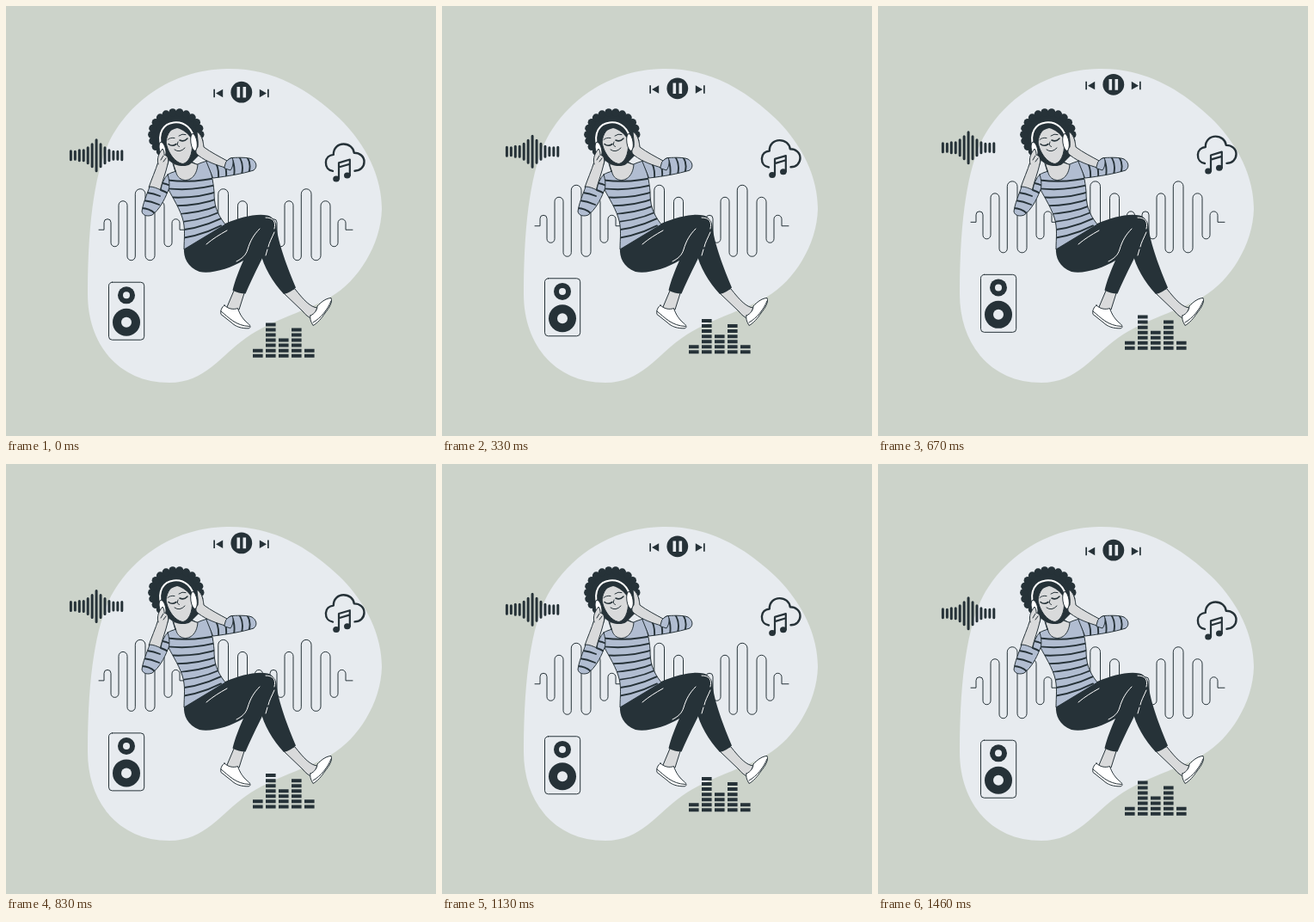
Recreate the animation shown at these times as an HTML page. Size 500x500 px, loop 1500 ms.

```html
<!DOCTYPE html>
<html lang="en">
<head>
<meta charset="utf-8">
<title>Listening to music</title>
<style>
  html, body { margin: 0; height: 100%; overflow: hidden; background: #ccd3ca; }
  svg { display: block; width: 100vw; height: 100vh; }
  .ink { fill: #263238; }
  .pale { fill: #e7ebef; }
  .line { fill: none; stroke: #263238; stroke-linecap: round; stroke-linejoin: round; }
  .skin, .shirt, .white { stroke: #263238; stroke-width: 1; stroke-linejoin: round; stroke-linecap: round; }
  .skin { fill: #d9dadb; }
  .shirt { fill: #b1bdd1; }
  .white { fill: #fff; }
  .seam { fill: none; stroke: #fff; stroke-width: 1; stroke-linecap: round; }
</style>
</head>
<body>
<svg viewBox="0 0 500 500">
  <defs>
    <path id="torso" d="M188 196C191 194 195 193 198 192L223 184C227 182 231 181 234 180C238 189 241 204 242 216C242 230 244 240 255 254L207 283C207 270 209 258 205 246C200 231 191 219 188 211Z"/>
    <path id="leftSleeve" d="M188 196C190 202 191 211 188 216C184 226 178 237 170 243C165 245 159 244 158 239C159 230 164 219 167 210C171 210 176 212 180 214C181 207 184 200 188 196Z"/>
    <path id="rightSleeve" d="M233 180C241 179 250 180 256 181C258 179 260 177 263 176.500C272 176 281 176 286 178C291 181 293 187 288 191C275 195 258 198 241 200Z"/>
    <clipPath id="torsoClip"><use href="#torso"/></clipPath>
    <clipPath id="leftClip"><use href="#leftSleeve"/></clipPath>
    <clipPath id="rightClip"><use href="#rightSleeve"/></clipPath>
  </defs>

  <path class="pale" d="M257 73C310 72 352 97 387 130C420 162 437 200 437 236C436 278 409 320 378 338C350 355 312 363 279 386C250 406 232 438 190 438C130 438 95 392 95 335C95 240 106 190 119 160C140 115 190 74 257 73Z"/>

  <g id="floating">
    <path id="wave" class="line"/>
    <path id="voice" class="line" stroke-width="3"/>
    <path id="equalizer" class="ink"/>

    <circle class="ink" cx="273.8" cy="100.5" r="12.4"/>
    <path class="pale" d="M268.5 94.2h3.6v12.6h-3.6zM275.5 94.2h3.6v12.6h-3.6z"/>
    <path class="ink" d="M241.3 97h1.7v9.5h-1.7zM252.2 97v9.5l-8.2-4.7zM304 97h1.7v9.5h-1.7zM294.8 97v9.5l8.2-4.7z"/>

    <path class="line" stroke-width="2.4" d="M380 192.2C375 191.600 371.7 187.600 371.9 182C372.2 176.600 376 173.600 380.8 173.2C380.6 165.600 386 160.800 392.5 160.800C399 160.800 404 165 404.8 171C411 170.900 416.6 175 416.5 181.500C416.4 187.600 412 191.900 405.5 192"/>
    <path class="line" stroke-width="2.2" d="M387 201.2V182.6L399.8 178.8V197.4M387 187.8L399.8 184"/>
    <ellipse class="ink" cx="384" cy="201.2" rx="3.8" ry="3.5"/>
    <ellipse class="ink" cx="396.8" cy="197.4" rx="3.8" ry="3.5"/>

    <rect class="line" x="119.5" y="321.5" width="41.2" height="67" rx="4"/>
    <circle class="ink" cx="140" cy="336.6" r="10"/>
    <circle class="pale" cx="140" cy="336.6" r="4"/>
    <circle class="ink" cx="140" cy="368" r="16"/>
    <circle class="pale" cx="140" cy="368" r="6"/>
  </g>

  <g id="legs">
    <path class="skin" d="M323 334L345 355C348 359 352 362 356 364L362 351C354 350 347 343 336 329Z"/>
    <path class="white" d="M354 360C359 358 362 353 362 349C366 345 371 340 378 339.500C380 344 376 351 371 357C367 363 362 369 357 371.500C355 368 353 364 354 360Z"/>
    <path class="line" d="M378 343C374 353 366 363 357 368"/>
    <path class="ink" d="M299 250C307 244 314 247 314.500 256C316 275 328 306 337 327.500C333 331 328 334 323 335C310 321 299 302 296.500 288Z"/>
    <path class="skin" d="M265 331L257 350C261 355 267 355 271 353L277 334Z"/>
    <path class="white" d="M254 348C258 352 264 353.500 269.500 351.500C272 359 276 365 282.500 370C284.500 372 284.500 374.500 282 374.800C274 375 267 373 262 368L250 358.500C249 354 251 350 254 348Z"/>
    <path class="line" d="M250 355C259 362 267 372 283 372.500"/>
    <path class="ink" d="M207 281C224 270 240 260 256 252.500C272 246 290 241 304 243.500C314 246 315 257 311 264C302 287 288 312 278.500 334.500C273 334.500 268 333 263.500 330.500C266 320 271 307 276 296C261 305 239 312 225 309C211 304 206 292 207 281Z"/>
    <path class="seam" d="M233 277C240 271 248 266 257 261M268 297C274 294 279 290 281 283C284 273 288 266 295 259M312 263C309 270 306 275 305 280M304 283L302 290M302 246C311 246 314 251 312 259"/>
  </g>

  <g id="body">
    <path class="skin" d="M194 183L197 193C201 207 219 207 223 185L214 180Z"/>
    <use href="#torso" class="shirt"/>
    <path class="skin" d="M197.500 192.500C200 207 221 207 223 184.500L213 181L195 184Z"/>
    <path id="torsoStripes" class="line" stroke-width="1.9" clip-path="url(#torsoClip)"/>
    <path class="skin" d="M185 170C180 171 177 175 177 181C174 191 169 202 166 211L179 215C182 203 186 193 188 184C190 178 190 173 185 170Z"/>
    <use href="#leftSleeve" class="shirt"/>
    <path class="line" stroke-width="1.9" clip-path="url(#leftClip)" d="M164 217Q172 218 179 221M182 206Q188 207 193 210M180 214Q186 216 190 219M160 226Q169 227 178 231M157 235Q166 235 173 241"/>
    <use href="#rightSleeve" class="shirt"/>
    <path class="line" stroke-width="1.9" clip-path="url(#rightClip)" d="M242 179Q248 188 247 200M252 179Q257 188 256 199M262 176Q267 186 265 198M271 175Q277 184 274 196M280 175Q286 184 282 195"/>
  </g>

  <g id="head">
    <g id="hair" class="ink"><ellipse cx="197.800" cy="149.500" rx="29" ry="27"/><path d="M170 155L180 174L190 180C196 186 208 188 214 184L226 172L228 152Z"/></g>
    <path class="skin" d="M186 158C187 149 192 141 200 138.500C208 139 214 146 216 155C218 166 215 181 206 183.500C198 183 188 172 186 158Z"/>
    <path class="ink" d="M183 161C185 150 190 144 199 142C206 144 212 148 217 157C218 147 213 135 198 134C184 136 179 149 183 161Z"/>
    <path class="line" stroke-width="3.8" d="M180.500 164C176 147 183 137 195 135.500C208 134 217 143 219 156"/>
    <path class="seam" style="stroke-width:2" d="M180.500 164C176 147 183 137 195 135.500C208 134 217 143 219 156"/>
    <ellipse class="white" cx="182" cy="167" rx="3.600" ry="9" transform="rotate(-12 182 167)"/>
    <ellipse class="white" cx="218.500" cy="158.500" rx="3.600" ry="10" transform="rotate(-8 218.500 158.500)"/>
    <path class="line" stroke-width="1.6" d="M189 160.500Q193 164 198 160.500M202 156Q207 158.500 211 154"/>
    <path class="line" d="M196 167Q202 171.500 208 165M188 155.500Q191 152.500 196 153.500M201 151Q205 148 209 149.500M200 158Q198 162.500 201.500 163.500"/>
    <path class="skin" d="M177 184C175 177 178 171 182 166C184 169 184 171 184 173C188 174 190 178 188 184"/>
    <path class="skin" d="M222 146C227 149 229 155 230 164C238 170 248 175 257 180L255 188C245 185 233 181 224 174C220 171 220 168 223 164C224 158 222 151 222 146Z"/>
    <path class="line" d="M180 179L183 174M183 181L186 177"/>
    <path class="shirt" d="M256 181C258 179 260 177 263 176.500C265 181 264 187 261 191C258 190 256 189.500 254 188.500Z"/>
  </g>
</svg>
<script>
const byId = id => document.getElementById(id);
const setPath = (id, d) => byId(id).setAttribute('d', d);

// Sound wave: one rounded pattern repeated three times.
const edges = [6, 14, 23, 33, 42.3, 54, 65, 76, 85, 94];
const turns = [248, 280, 227, 296, 213, 296, 227, 280, 248];
let wave = 'M108 260.5';
for (let k = 0; k < 3; k++) {
  const start = 108 + k * 96.5;
  wave += `H${start + edges[0]}`;
  turns.forEach((y, i) => {
    const r = (edges[i + 1] - edges[i]) / 2, up = i % 2 === 0;
    wave += `V${up ? y + r : y - r}a${r} ${r} 0 0 ${up ? 1 : 0} ${2 * r} 0`;
  });
  wave += 'V260.5';
}
setPath('wave', wave + 'H403');

const voiceHeights = [5, 4.5, 6, 6, 9, 13, 18, 13, 9, 6, 4.5, 4.5, 5];
setPath('voice', voiceHeights.map((h, i) => `M${75.4 + i * 4.95} ${174 - h}v${2 * h}`).join(''));

let blocks = '';
[2, 7, 4, 6, 2].forEach((count, col) => {
  for (let row = 0; row < count; row++) blocks += `M${287 + col * 15} ${405 - row * 6.05}h11.6v4h-11.6z`;
});
setPath('equalizer', blocks);

let stripes = '';
for (let i = 0; i < 8; i++) {
  const left = 202 + i * 10, right = 198 + i * 8.2;
  stripes += `M184 ${left}Q220 ${(left + right) / 2 + 7} 250 ${right}`;
}
setPath('torsoStripes', stripes);

// Curls around the hair.
let curls = '';
for (let i = 0; i < 22; i++) {
  const a = i / 22 * Math.PI * 2;
  curls += `<circle cx="${197.8 + 28.2 * Math.cos(a)}" cy="${149.5 + 26 * Math.sin(a)}" r="4.5"/>`;
}
byId('hair').innerHTML += curls;

// Linear rise and fall by 10 units, stepped at 24 pictures per second.
const LOOP = 1500, STEPS = 36;
function draw() {
  const step = Math.floor((performance.now() % LOOP + 5) / LOOP * STEPS) % STEPS;
  const phase = (step + 0.5) / STEPS;
  const rise = 10 * (1 - Math.abs(1 - 2 * phase));
  byId('floating').setAttribute('transform', `translate(0 ${-rise})`);
  requestAnimationFrame(draw);
}
draw();
</script>
</body>
</html>
```
